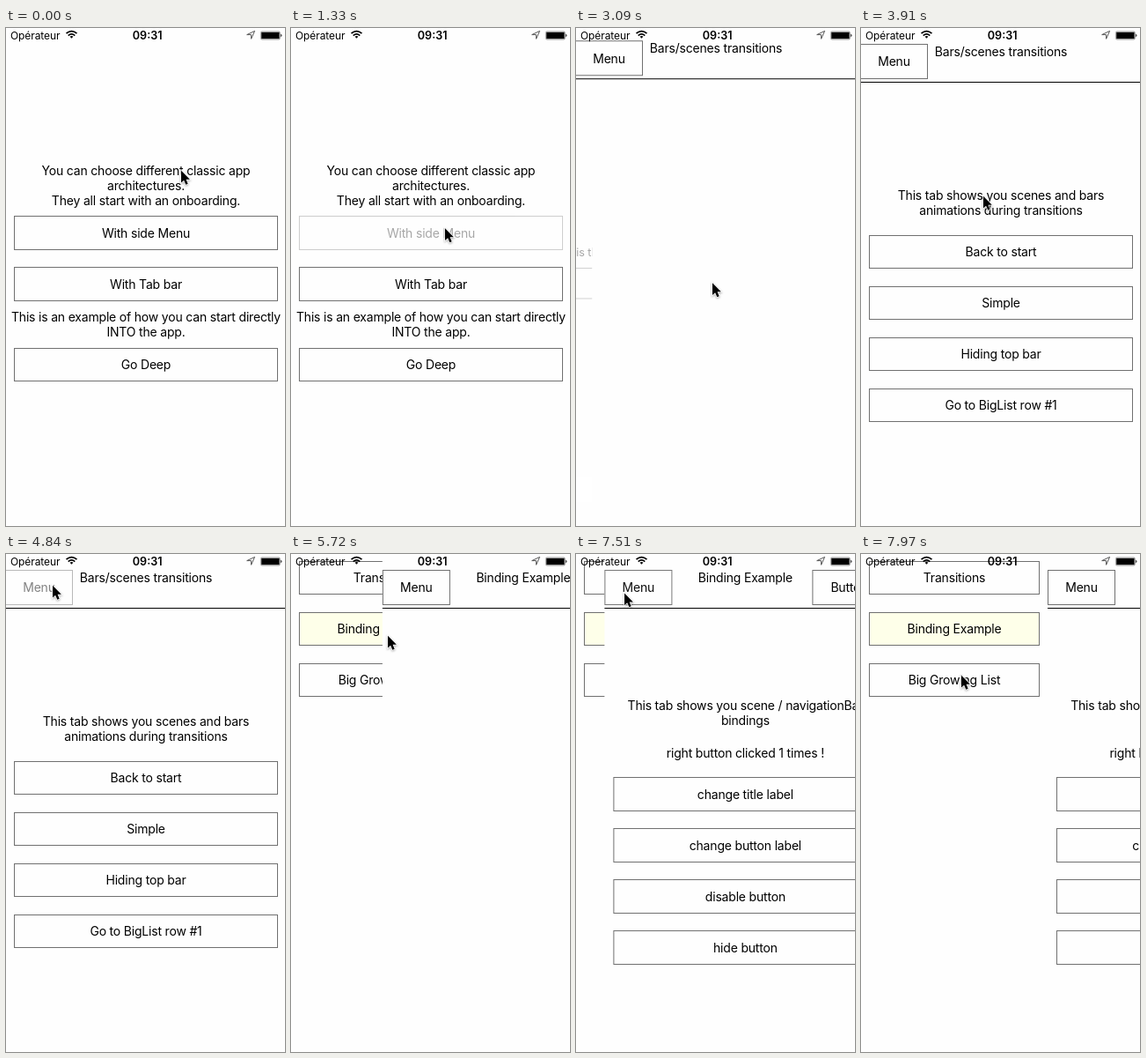
These frames come from a looping animation (317x565 px, 8000 ms). An HTML page:

```html
<!DOCTYPE html>
<html lang="en">
<head>
<meta charset="utf-8">
<title>App architectures</title>
<style>
html, body { margin: 0; height: 100%; overflow: hidden; background: #fefefe; }
svg { display: block; width: 317px; height: 565px; }
text { font: 14px Inter, Roboto, sans-serif; letter-spacing: -.19px; text-anchor: middle; }
.box { fill: none; stroke: #707070; }
.page { fill: #fefefe; }
.status text { font-size: 12px; letter-spacing: -.1px; text-anchor: start; }
</style>
</head>
<body>
<svg id="stage" viewBox="0 0 317 565"></svg>
<script>
const W = 317, LOOP = 8000, DRAWER = 213;

const label = (x, y, s) => `<text x="${x}" y="${y}">${s}</text>`;
const lines = (y, ...rows) => rows.map((s, i) => label(159, y + i * 17, s)).join('');
const button = (y, s, id = '', x = 9, w = 299, h = 38) =>
  `<g id="${id}"><rect class="box" x="${x + .5}" y="${y + .5}" width="${w}" height="${h}"/>${label(x + w / 2 + .5, y + h / 2 + 5.9, s)}</g>`;
const buttons = (y, h, ...names) => names.map((s, i) => button(y + i * 58, s, '', 9, 299, h)).join('');
const group = (id, body) => `<g id="${id}">${body}</g>`;
const page = `<rect class="page" x="-1" width="${W + 2}" height="565"/>`;

stage.innerHTML =
  group('start', lines(166.5, 'You can choose different classic app', 'architectures.', 'They all start with an onboarding.') +
    button(213, 'With side Menu', 'sideMenu') + button(271, 'With Tab bar') +
    lines(333, 'This is an example of how you can start directly', 'INTO the app.') +
    button(363, 'Go Deep', '', 9, 299, 37)) +
  group('intro', page + lines(257, 'This is the onboarding example.') + button(271, 'Go to the app', 'enter')) +
  group('drawer', page + ['Transitions', 'Binding Example', 'Big Growing List']
    .map((s, i) => button(8 + i * 58, s, 'row' + i, 9, 193, 37)).join('')) +
  group('scene', page +
    group('bars', lines(195, 'This tab shows you scenes and bars', 'animations during transitions') +
      buttons(235, 37, 'Back to start', 'Simple', 'Hiding top bar', 'Go to BigList row #1')) +
    group('binding', lines(176.5, 'This tab shows you scene / navigationBar', 'bindings') +
      lines(230.5, 'right button clicked 1 times !') +
      buttons(253, 38, 'change title label', 'change button label', 'disable button', 'hide button'))) +
  group('nav', `<rect class="page" x="-1" width="${W + 2}" height="62"/><path d="M-1 61.5H318" stroke="#000"/>` +
    button(18, 'Menu', 'menu', -1, 76, 39) +
    group('barsNav', label(159, 32, 'Bars/scenes transitions')) +
    group('bindingNav', label(159, 32, 'Binding Example') + button(18, 'Button', '', 235, 83, 39))) +
  `<g class="status">${label(5, 12.5, 'Opérateur')}
    <text x="143.8" y="12.5" style="font-size:12.6px;font-weight:600;letter-spacing:0">09:31</text>
    <g fill="none" stroke="#000" stroke-width="1.7">
      <path d="M68.5 6.2Q74.5 .9 80.5 6.2M70.7 8.6Q74.5 5.2 78.3 8.6"/>
      <path d="M72.6 9.7Q74.5 8.2 76.4 9.7L74.5 11.8Z" fill="#000" stroke="none"/>
      <path d="M273.7 7.6L282.6 3.4L278.6 12.3V7.6Z" stroke="#555" stroke-width="1"/>
      <rect x="289.4" y="4" width="22" height="9" rx="1.5" stroke="#777" stroke-width=".7"/>
    </g>
    <rect x="290.2" y="4.8" width="20.4" height="7.4"/><path d="M312.3 6.8Q314.6 8.5 312.3 10.2Z"/></g>
  <g id="cursor"><path d="M0 0V14.5L3.3 11.4L5.6 16.8L8.1 15.7L5.9 10.5H10.4Z" transform="translate(.5 1.3) scale(.95)"
    stroke="#fff" stroke-width="1.6" paint-order="stroke" style="filter:drop-shadow(0 1px 1px #0005)"/></g>`;

const el = id => document.getElementById(id);
const clamp = v => Math.min(1, Math.max(0, v));
const mix = (a, b, p) => a + (b - a) * p;
const ramp = (t, from, len) => clamp((t - from) / len);
const ease = (t, from, to) => {
  const p = ramp(t, from, to - from);
  return p < .5 ? 4 * p ** 3 : 1 - 4 * (1 - p) ** 3;
};
// Touch feedback: fade down from `down`, back up from `up`.
const press = (t, down, up) => 1 - .7 * Math.min(ramp(t, down, 150), 1 - ramp(t, up, 250));
const move = (id, x, y = 0) => el(id).setAttribute('transform', `translate(${x} ${y})`);
const show = (id, on) => el(id).style.display = on ? '' : 'none';
const fade = (id, a) => el(id).style.opacity = a;

// Outgoing page slides left, shrinks about the stage centre and fades.
function leave(id, p, x = 0) {
  const s = 1 - .1 * p;
  el(id).setAttribute('transform', `translate(${158.5 + x - 100 * p} 282.5) scale(${s}) translate(-158.5 -282.5)`);
  fade(id, 1 - .7 * p);
}

// Cursor moves: start, end, x, y
const path = [
  [420, 870, 173.5, 226], [1030, 1040, 174.5, 226], [1700, 2260, 154.5, 288],
  [3790, 4020, 126.5, 116.5], [4180, 4720, 52.5, 34.5], [5080, 5400, 109.5, 91.5],
  [5830, 6440, 54.5, 43], [7480, 7960, 113.5, 136.5]
];

function draw(t) {
  const first = ease(t, 1440, 1980), second = ease(t, 2790, 3190);
  const open = ease(t, 4880, 5280) - ease(t, 5520, 5920) + ease(t, 7280, 7960);
  const late = t >= 5520;

  leave('start', first);
  show('start', first < 1);
  leave('intro', second, W * (1 - first));
  show('intro', first > 0 && second < 1);
  show('drawer', second >= 1);
  show('scene', second > 0);
  show('nav', second > 0);

  const x = open * DRAWER;
  move('scene', W * (1 - second) + x);
  move('nav', x, -62 * (1 - second));
  show('bars', t >= 3300 && !late);
  show('binding', t >= 6790);
  show('barsNav', !late);
  show('bindingNav', late);

  fade('sideMenu', press(t, 1190, 1400));
  fade('enter', press(t, 2400, 2800));
  fade('menu', t < 6000 ? press(t, 4730, 4880) : press(t, 7110, 7280));
  fade('row1', press(t, 5370, 5460));
  [0, 1].forEach(i => el('row' + i).firstChild.style.fill = late == i ? '#feffe9' : 'none');

  let cx = 198.5, cy = 160.5;
  for (const [from, to, px, py] of path) {
    const p = ease(t, from, to);
    cx = mix(cx, px, p);
    cy = mix(cy, py, p);
  }
  move('cursor', cx, cy);
}

function tick() {
  draw(performance.now() % LOOP);
  requestAnimationFrame(tick);
}
tick();
</script>
</body>
</html>
```
